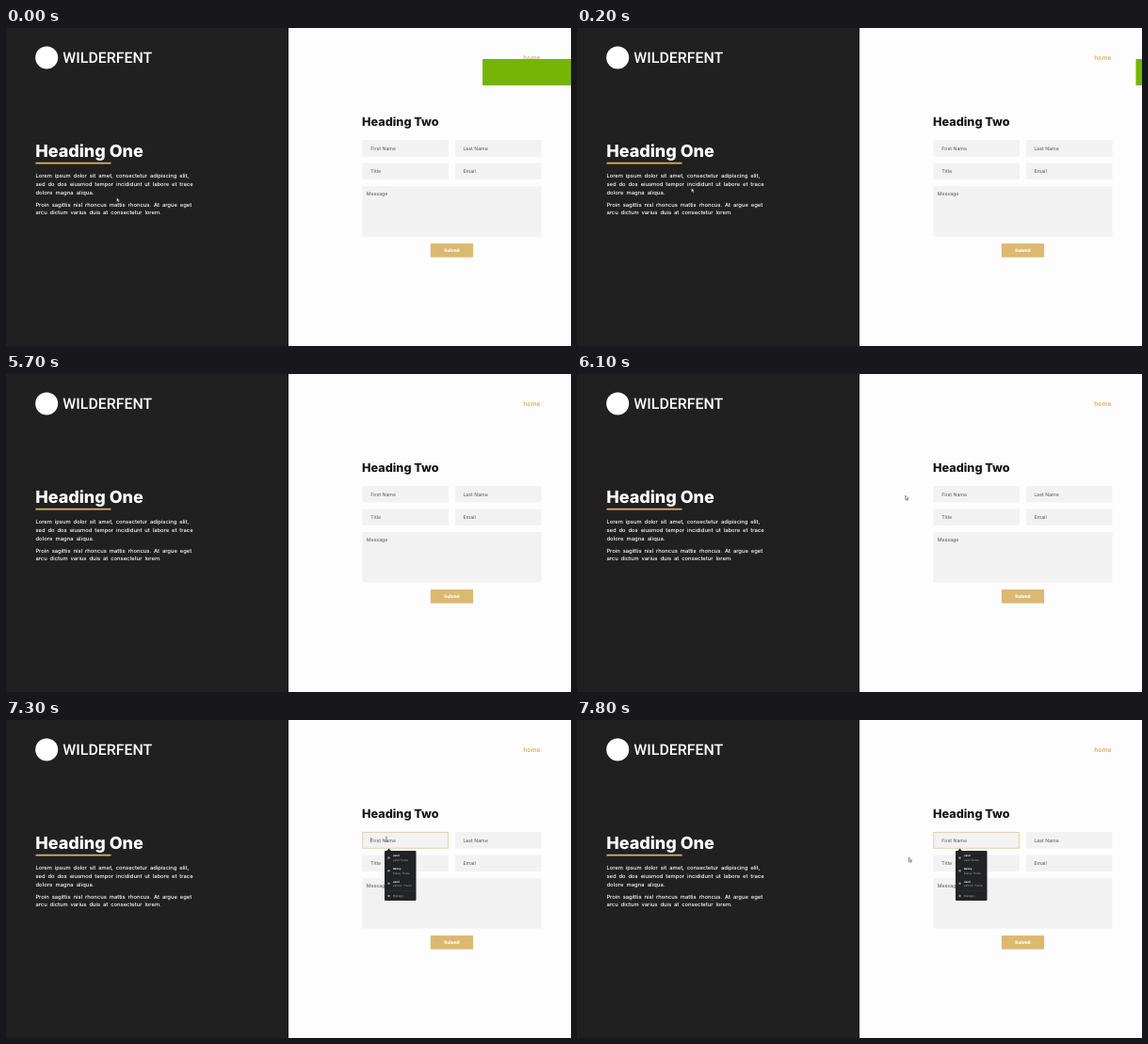
Write an HTML page that moves like this. It is 600 px wide and 338 px high and loops after 8 s.

```html
<!DOCTYPE html>
<html lang="en">
<head>
<meta charset="utf-8">
<title>Contact form</title>
<style>
  html, body { margin: 0; width: 100%; height: 100%; overflow: hidden; background: #fdfdfd; }
  svg { display: block; width: 100%; height: 100%; }
  text { font-family: Inter, "Open Sans", sans-serif; font-optical-sizing: none; text-rendering: geometricPrecision; }
  .brand { font: 500 15.9px Roboto, sans-serif; fill: #fff; }
  .h1 { font-size: 18px; font-weight: 800; fill: #fff; }
  .h2 { font-size: 12.65px; font-weight: 800; fill: #151515; }
  .body text { font-size: 5.8px; font-weight: 500; word-spacing: 1.4px; fill: #fff; }
  .nav { font-size: 6.8px; font-weight: 600; fill: #d9b068; }
  .label text { font-size: 5.2px; font-weight: 500; fill: #6a6a6a; }
  .button { font-size: 4.8px; font-weight: 800; fill: #fff; }
  .field rect { fill: #f2f2f2; }
  .menu text { font-size: 2.9px; fill: #a3a4a7; }
  .menu .name { font-weight: 700; fill: #f0f0f0; }
</style>
</head>
<body>
<svg viewBox="0 0 600 338" preserveAspectRatio="none">
  <rect width="600" height="338" fill="#fdfdfd"/>
  <rect width="300" height="338" fill="#202020"/>

  <circle cx="43.2" cy="31.5" r="12" fill="#fff"/>
  <text class="brand" x="60.3" y="37.2">WILDERFENT</text>

  <text class="h1" x="31.2" y="137.4">Heading One</text>
  <rect x="31.5" y="142.8" width="80" height="1.7" fill="#dcb56c"/>
  <g class="body">
    <text x="31.4" y="159.3">Lorem ipsum dolor sit amet, consectetur adipiscing elit,</text>
    <text x="31.4" y="168">sed do dos eiusmod tempor incididunt ut labore et trace</text>
    <text x="31.4" y="176.7" letter-spacing=".08">dolore magna aliqua.</text>
    <text x="31.4" y="189.7">Proin sagittis nisl rhoncus mattis rhoncus. At argue eget</text>
    <text x="31.4" y="198.4">arcu dictum varius duis at consectetur lorem.</text>
  </g>

  <text class="nav" x="549.2" y="33.9">home</text>
  <text class="h2" x="378.1" y="104.2">Heading Two</text>
  <g class="field">
    <rect x="378.5" y="119" width="91.5" height="17.5"/>
    <rect x="477" y="119" width="91.5" height="17.5"/>
    <rect x="378.5" y="143.5" width="91.5" height="17.5"/>
    <rect x="477" y="143.5" width="91.5" height="17.5"/>
    <rect x="378.5" y="168" width="190" height="53.5"/>
  </g>
  <g class="label">
    <text x="387.2" y="129.6">First Name</text>
    <text x="485.4" y="129.6">Last Name</text>
    <text x="387.2" y="154.2">Title</text>
    <text x="485.4" y="154.2">Email</text>
    <text x="382.8" y="177.7">Message</text>
  </g>
  <rect x="450.8" y="229.1" width="45.3" height="14.6" fill="#dcb970"/>
  <text class="button" x="473.5" y="238" text-anchor="middle">Submit</text>

  <g id="focus">
    <rect x="378.8" y="119.3" width="90.9" height="16.9" fill="none" stroke="#dfc48b" stroke-width=".7"/>
    <rect id="caret" x="387" y="124.8" width=".5" height="5.6" fill="#444"/>
    <g class="menu">
      <path d="M404.3 139.2L406.6 136.5L408.9 139.2Z" fill="#222327"/>
      <rect x="402" y="139" width="33.5" height="53" rx="1" fill="#222327"/>
      <path d="M402 181.7H435.5" stroke="#35363a" stroke-width=".5"/>
      <g id="rows"></g>
      <text x="410.8" y="188">Manage...</text>
    </g>
  </g>

  <rect id="panel" y="33" width="100" height="28" fill="#76b505"/>

  <g id="arrow">
    <path d="M0 0V4.5L1.1 3.5L1.9 5.2L2.7 4.8L1.9 3.2H3.2Z" fill="#fff" stroke="#222" stroke-width=".5"/>
  </g>
  <g id="beam" fill="none">
    <path d="M-.8 -2.3H.8M0 -2.3V2.3M-.8 2.3H.8" stroke="#333" stroke-width=".5"/>
  </g>
</svg>
<script>
  const LOOP = 8000, STEP = 100;
  const el = id => document.getElementById(id);
  const show = (node, on) => node.setAttribute("visibility", on ? "inherit" : "hidden");

  const people = [["Jarel", "Jarel Trome"], ["daney", "Daney Trome"], ["Jarel", "Jarel Q. Trome"]];
  const icon = y => `<circle cx="406.5" cy="${y}" r="1.3" fill="#85868a"/>`;
  el("rows").innerHTML = people.map(([name, full], i) => {
    const y = 145.3 + i * 13.6;
    return `${icon(y + 1.3)}<text class="name" x="410.8" y="${y}">${name}</text>` +
      `<text x="410.8" y="${y + 4.8}">${full}</text>`;
  }).join("") + icon(187);

  // Each move: start, end, from, to, downward bow
  const moves = [
    [100, 300, [117.6, 180.2], [125.5, 160], 0],
    [800, 1100, [125.5, 160], [125.6, 125], 0],
    [5600, 6300, [125.6, 125], [404, 126.7], 5],
    [7400, 7800, [404, 126.7], [352.4, 146.2], 0]
  ];

  function pointer(t) {
    const [start, end, a, b, bow] = moves.filter(m => t >= m[0]).pop() || moves[0];
    const p = Math.min(1, Math.max(0, (t - start) / (end - start)));
    const e = p * p * (3 - 2 * p);
    return [a[0] + (b[0] - a[0]) * e,
            a[1] + (b[1] - a[1]) * e + bow * Math.sin(Math.PI * e)];
  }

  function overText(x, y) {
    const heading = x < 150 && y < 142;
    const field = x > 378.5 && x < 470 && y > 119 && y < 136.5;
    return heading || field;
  }

  function draw(time) {
    const t = Math.floor(time % LOOP / STEP) * STEP;

    const slide = 1 - t / 300;
    el("panel").setAttribute("x", 600 - 94 * Math.pow(Math.max(0, slide), 2.43));
    show(el("panel"), slide > 0);

    show(el("focus"), t >= 7300);
    show(el("caret"), t >= 7300 && t < 7800);

    const [x, y] = pointer(t), text = overText(x, y);
    for (const id of ["arrow", "beam"]) {
      el(id).setAttribute("transform", `translate(${x} ${y})`);
      show(el(id), (id === "beam") === text);
    }
  }

  const begin = performance.now();
  function tick() {
    draw(performance.now() - begin);
    requestAnimationFrame(tick);
  }
  tick();
</script>
</body>
</html>
```
